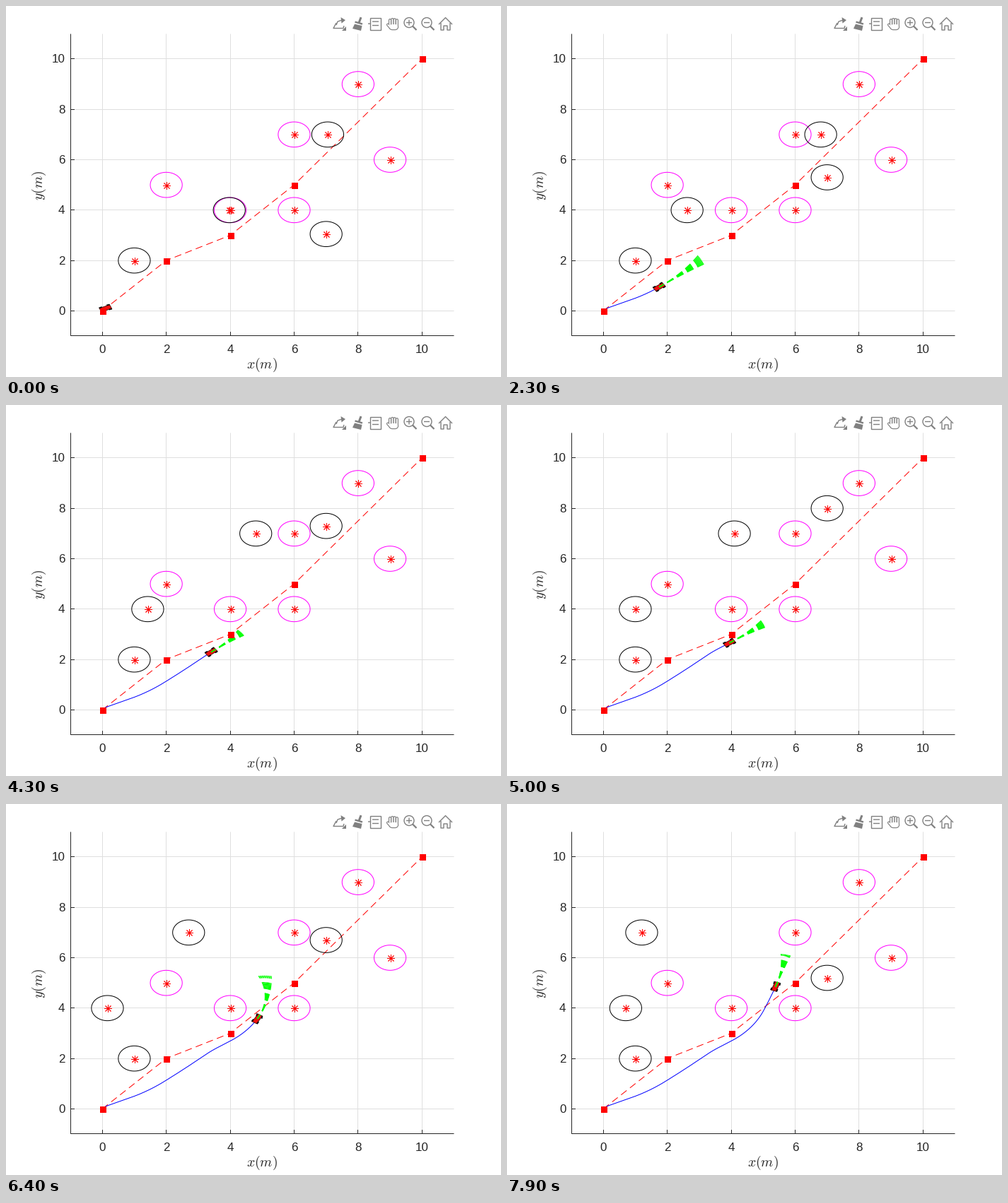
Recreate the animation shown at these times as a matplotlib script. Size 700x525 px, loop 8 s.

```python
import numpy as np
import matplotlib.pyplot as plt
from matplotlib.animation import FuncAnimation
from matplotlib.collections import LineCollection
from matplotlib.patches import Circle, Polygon

W, H, DPI = 700, 525, 100
FRAMES = 80
PX = 72 / DPI  # one pixel in points
INK, GRID, ICON = "#262626", "#dfdfdf", "#808080"
RED, MAGENTA, GREEN = "#ff0000", "#ff00ff", "#00ff00"

plt.rcParams["font.family"] = "Liberation Sans"
plt.rcParams["mathtext.fontset"] = "cm"
plt.rcParams["lines.solid_capstyle"] = "butt"

fig = plt.figure(figsize=(W / DPI, H / DPI), dpi=DPI, facecolor="white")
ax = fig.add_axes([0, 0, 1, 1])
ax.set_xlim(0, W)
ax.set_ylim(H, 0)
ax.axis("off")

LEFT, BOTTOM, RIGHT, TOP = 91.5, 466.5, 633.5, 39.5
SX, SY = 0.775 * W / 12, 0.815 * H / 12  # pixels per metre


def to_x(x):
    return 91 + SX * (np.asarray(x) + 1)


def to_y(y):
    return 467.1 - SY * (np.asarray(y) + 1)


def mid(v):
    """Centre of the pixel that holds v."""
    return np.floor(v) + 0.5


def line(xs, ys, color=INK, w=1, **kw):
    return ax.plot(xs, ys, color=color, lw=w * PX, snap=False, **kw)[0]


def label(x, y, text, size, **kw):
    ax.text(x, y, text, color=INK, size=size * PX, va="center", **kw)


# Axes
for v in range(0, 11, 2):
    x, y = mid(to_x(v)), mid(to_y(v))
    line([x, x], [TOP, BOTTOM], GRID, zorder=0)
    line([LEFT, RIGHT], [y, y], GRID, zorder=0)
    line([x, x], [BOTTOM - 5.5, BOTTOM], zorder=1)
    line([LEFT, LEFT + 5.5], [y, y], zorder=1)
    label(x, 486.3, str(v), 17, ha="center")
    label(83.5, y + 1.2, str(v), 17, ha="right")
line([LEFT, LEFT, RIGHT], [TOP, BOTTOM, BOTTOM], zorder=1)
label(362.3, 507.5, "$x(m)$", 19.7, ha="center")
label(46.8, 254, "$y(m)$", 19.7, ha="center", rotation=90)


# Toolbar
def stroke(*points, w=1.4, color=ICON, **kw):
    line(*zip(*points), color=color, w=w, **kw)


def solid(*points):
    ax.add_patch(Polygon(points, fc=ICON, ec="none"))


# share
stroke((467, 24), (463, 31.5), (477, 31.5), (478, 28))
stroke((467, 27), (469, 22), (475, 20))
solid((473.5, 16), (480, 20), (474.5, 24.5))
solid((475, 34.5), (481, 34.5), (481, 29))

# brush
stroke((502, 16), (499, 24), w=3)
stroke((493.5, 22.5), (504, 25.5), w=2.4)
solid((493, 25.5), (503.5, 28), (502, 35), (490, 32))

# data tip
ax.add_patch(plt.Rectangle((514.5, 16.5), 15, 17, fc="none", ec=ICON, lw=1.4 * PX))
for y in (22, 27.5):
    stroke((518, y), (527, y))
stroke((512, 25), (515, 25))

# hand: thick grey strokes, then thinner white ones inside
for color, trim in ((ICON, 0), ("white", 2.4)):
    pen = dict(color=color, solid_capstyle="round")
    for i in range(4):
        x = 543 + 3.3 * i
        stroke((x, 18.5 + abs(i - 1.4)), (x, 28), w=4.2 - trim, **pen)
    stroke((540, 26.5), (544, 31), w=4.2 - trim, **pen)
    stroke((546, 29.5), (550.5, 29.5), w=9.5 - trim, **pen)

# zoom in and out
for cx in (570, 595):
    ax.add_patch(Circle((cx, 23.5), 7, fill=False, ec=ICON, lw=1.4 * PX))
    stroke((cx + 5, 28.5), (cx + 10.5, 34), w=2.2)
    stroke((cx - 4, 23.5), (cx + 4, 23.5))
stroke((570, 19.5), (570, 27.5))

# home
stroke((612, 26), (621.5, 16.5), (631, 26))
stroke((615, 24), (615, 34), (619, 34), (619, 28), (624, 28), (624, 34), (628, 34), (628, 24))

# Obstacles
ring = np.linspace(0, 2 * np.pi, 80)


class Obstacle:
    def __init__(self, x, y, color, z):
        self.rim = line([], [], color, zorder=z)
        self.star = line([], [], RED, marker=(8, 2, 0), ms=11 * PX, mew=0.9 * PX, zorder=z)
        self.move(x, y)

    def move(self, x, y):
        self.rim.set_data(to_x(x + 0.5 * np.cos(ring)), to_y(y + 0.5 * np.sin(ring)))
        self.star.set_data([mid(to_x(x))], [mid(to_y(y))])


for x, y in [(8, 9), (6, 7), (9, 6), (2, 5), (4, 4), (6, 4)]:
    Obstacle(x, y, MAGENTA, 2)
Obstacle(1, 2, "black", 3)
left, upper, riser = (Obstacle(x, y, "black", 3) for x, y in [(4, 4), (7, 7), (7, 3)])


def bounce(pos, step, lo, hi):
    """Positions per simulation step; turns once a limit is passed."""
    out = [pos]
    for _ in range(2 * FRAMES):
        pos += step
        out.append(pos)
        if pos > hi + 1e-6 or pos < lo - 1e-6:
            step = -step
    return out


left_x = bounce(4, -0.03, 0, 4)
upper_x = bounce(7, 0.05, 0, 8)
riser_y = bounce(3, 0.05, 0, 8)

# Planned route
route = np.array([(0, 0), (2, 2), (4, 3), (6, 5), (10, 10)])
rx, ry = to_x(route[:, 0]), to_y(route[:, 1])
line(rx, ry, RED, ls=(0, (10, 6)), zorder=2)
line(mid(rx), mid(ry), RED, ls="none", marker="s", ms=9 * PX, mew=0, zorder=8)

# Car: speed up, cruise, then slow a little, while steering between headings
SUB = 10
t = np.arange(FRAMES * SUB) / SUB
speed = np.minimum(0.0084 * t, np.where(t < 36, 0.1145, 0.0928))
heading = np.radians(np.interp(t, [0, 14, 25, 40, 46, 51, 68, 79],
                               [24, 24, 38, 41, 33, 33.5, 67, 70]))
car_x = 0.1 + np.cumsum(speed * np.cos(heading)) / SUB
car_y = 0.1 + np.cumsum(speed * np.sin(heading)) / SUB

trail = line([], [], "#0000ff", zorder=4)
fan = LineCollection([], colors=GREEN, linewidths=1.15 * PX,
                     linestyles=[(2.6, (8.7, 5.2))], zorder=6)
ax.add_collection(fan)


def part(color, edge, w, z):
    return ax.add_patch(Polygon(np.zeros((4, 2)), fc=color, ec=edge, lw=w * PX, zorder=z))


body = part("#f01010", "#501008", 0.9, 5)
wheels = [part("black", "black", 0.5, 5.5) for _ in range(4)]
corners = [(a, b) for a in (-0.13, 0.13) for b in (-0.095, 0.095)]


def rotate(pts, angle):
    c, s = np.cos(angle), np.sin(angle)
    return pts @ np.array([(c, s), (-s, c)])


def box(length, width):
    return np.array([(-1, -1), (1, -1), (1, 1), (-1, 1)]) * (length / 2, width / 2)


def place(pts, pos, yaw):
    """Car coordinates to pixels."""
    x, y = (rotate(pts, yaw) + pos).T
    return np.column_stack([to_x(x), to_y(y)])


def arc(reach, bend):
    """Circular arc whose chord leaves at the angle bend."""
    a = 2 * bend * (np.arange(30) + 0.5) / 30
    steps = np.column_stack([np.cos(a), np.sin(a)]) * reach / 30
    return np.vstack([(0, 0), np.cumsum(steps, axis=0)])


def update(k):
    n = max(1, 2 * k)
    left.move(left_x[n], 4)
    upper.move(upper_x[n], 7)
    riser.move(7, riser_y[n])

    i = k * SUB
    pos, yaw = (car_x[i], car_y[i]), heading[i]
    trail.set_data(to_x(car_x[:i + 1]), to_y(car_y[:i + 1]))

    reach = min(0.12 * k, 1.5 + 0.28 * np.cos(2 * np.pi * (k - 23) / 41))
    bend = np.radians(np.interp(k, [11, 23, 50, 64, 79], [-5, 4, 2, 23, 6]))
    fan.set_segments([place(arc(reach, bend + d), pos, yaw)
                      for d in np.linspace(-0.115, 0.115, 12)])

    body.set_xy(place(box(0.35, 0.16), pos, yaw))
    for wheel, (a, b) in zip(wheels, corners):
        steer = bend if a > 0 else 0
        wheel.set_xy(place(rotate(box(0.09, 0.03), steer) + (a, b), pos, yaw))
    return []


anim = FuncAnimation(fig, update, frames=FRAMES, interval=100, repeat=True,
                     repeat_delay=0, blit=False)
plt.show()
```
